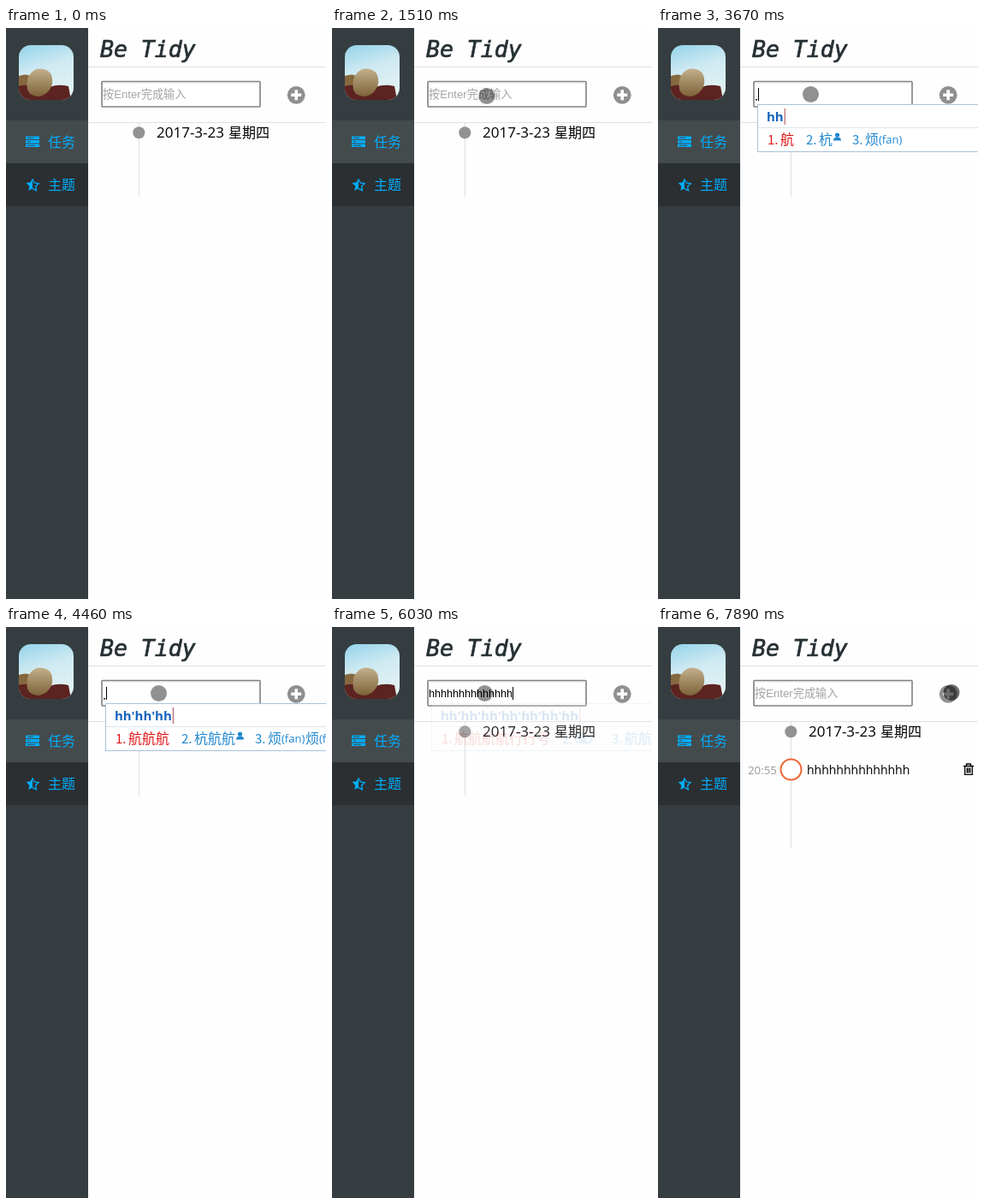
Animation, 374 px wide and 667 px high, one loop 8000 ms. Source, as an HTML page:

```html
<!DOCTYPE html>
<html lang="zh">
<head>
<meta charset="utf-8">
<style>
html, body { margin: 0; width: 100%; height: 100%; overflow: hidden; background: #fefefe; }
svg { display: block; width: 374px; height: 667px; font: 16px "Open Sans", "Noto Sans CJK SC", "Noto Sans CJK", sans-serif; }
.title { font: italic 26.5px "DejaVu Sans Mono", monospace; }
.field { font: 13.2px "Liberation Sans", "Noto Sans CJK SC", "Noto Sans CJK", sans-serif; }
.cjk { font-family: "Noto Sans CJK SC", "Noto Sans CJK", sans-serif; }
#pinyin { font-weight: bold; font-size: 15px; }
</style>
</head>
<body>
<svg viewBox="0 0 374 667">
  <defs>
    <clipPath id="round"><rect x="15" y="20" width="64" height="64" rx="14"/></clipPath>
    <linearGradient id="sky" x2=".3" y2="1">
      <stop stop-color="#94d3ea"/><stop offset=".5" stop-color="#cfeaf2"/><stop offset="1" stop-color="#e2f1f3"/>
    </linearGradient>
    <linearGradient id="fur" x2="0" y2="1">
      <stop stop-color="#c3b08c"/><stop offset="1" stop-color="#7d6238"/>
    </linearGradient>
  </defs>

  <!-- sidebar -->
  <rect width="96" height="667" fill="#353d40"/>
  <rect y="108" width="96" height="50" fill="#444b4d"/>
  <rect y="158" width="96" height="50" fill="#2b2f31"/>
  <g clip-path="url(#round)">
    <rect x="15" y="20" width="64" height="64" fill="url(#sky)"/>
    <path d="M15 56q10-4 16 2l6 26H15z" fill="#86683f"/>
    <path d="M15 68q12-4 22 4 8 4 14-3 10-4 22-1l3 16H15z" fill="#5c2320"/>
    <path d="M25 72q-2-14 4-19 6-7 15-5 9 2 10 11 1 8-3 13-4 6-12 8-11 0-14-8z" fill="url(#fur)"/>
  </g>
  <g fill="#00aeff">
    <rect x="23" y="126.500" width="16" height="3.600" rx=".6"/>
    <rect x="23" y="131" width="16" height="3.600" rx=".6"/>
    <rect x="23" y="135.500" width="16" height="3.600" rx=".6"/>
    <path d="M25 128.300h7M25 132.800h3M25 137.300h9" stroke="#444b4d"/>
    <path d="M31 175.500v12l-4.600 2.400.9-5.200-3.800-3.600 5.200-.8z"/>
    <path d="M31 176.500l2.200 4.500 4.900.7-3.500 3.400.8 4.800-4.400-2.300" fill="none" stroke="#00aeff" stroke-width="1.300"/>
    <text class="cjk" x="49" y="139">任务</text>
    <text class="cjk" x="49" y="189">主题</text>
  </g>

  <!-- header -->
  <text class="title" x="110" y="34" fill="#263034" stroke="#263034" stroke-width=".7">Be Tidy</text>
  <path d="M96 45.500h278M96 110.500h278" stroke="#e0e0e0"/>
  <rect x="112" y="62.500" width="185" height="29.500" rx="1" fill="#fff" stroke="#808080" stroke-width="1.600"/>
  <path d="M113.500 64h182" stroke="#ddd"/>
  <text id="hint" class="field" x="113" y="82" fill="#a4a4a4">按Enter完成输入</text>
  <text id="value" class="field" x="113" y="82" style="font-size:12.600px">hhhhhhhhhhhhhh</text>
  <rect id="mark" x="114" y="83" width="2" height="1.500"/>
  <rect id="caret" y="70" width="1" height="15"/>
  <circle cx="339.200" cy="78.300" r="10.400" fill="#8f8f8f"/>
  <path d="M333.200 78.300h12M339.200 72.300v12" stroke="#fff" stroke-width="3.600"/>

  <!-- timeline -->
  <path id="line" stroke="#dedede"/>
  <circle cx="155.300" cy="122.300" r="7" fill="#929292"/>
  <text x="176" y="128" style="font-size:17px">2017-3-23</text>
  <text class="cjk" x="260" y="128">星期四</text>
  <g id="item">
    <text x="105" y="172" fill="#999" style="font-size:13.300px">20:55</text>
    <circle cx="155.500" cy="166.500" r="12" fill="#fff" stroke="#ee6535" stroke-width="2"/>
    <text x="174" y="172" style="font-size:14px">hhhhhhhhhhhhhh</text>
    <path d="M357 162.500h12M360.500 162v-2h5v2M358.700 163v9.300h8.600V163M361.300 164.500v6M363 164.500v6M364.800 164.500v6" fill="none" stroke="#000" stroke-width="1.300"/>
  </g>

  <!-- input method window -->
  <g id="ime">
    <rect x="116.500" y="89.500" width="270" height="55" fill="#fff" stroke="#a8c3da"/>
    <path d="M117 116.500h257" stroke="#dbe5ec"/>
    <text id="pinyin" x="127" y="109" fill="#1463bd"></text>
    <rect id="bar" y="94" width="1" height="19" fill="#a54a4a"/>
    <g id="list"></g>
  </g>

  <circle id="pointer" r="9.500"/>
</svg>
<script>
const $ = id => document.getElementById(id);
const show = (id, on) => $(id).style.display = on ? "" : "none";

const LOOP = 8000, OPEN = 3420, COMMIT = 5810, GONE = 6080, CLICK = 7830, ADDED = 7890;
const keys = [OPEN, 3670, 3850, 4220, 4340, 4460, 4640, 4820, 4970, 5060, 5150, 5240, 5330, 5450];
const path = [
  [370, 301, 274], [640, 245, 160], [910, 212, 105], [1150, 195, 91], [1570, 178.500, 77.500],
  [6940, 178.500, 77.500], [7030, 225, 85], [7120, 274.500, 76.500], [7240, 318, 63], [7480, 338, 73], [7720, 343, 76.500]
];
const carets = [[1820, 2130], [2620, 3110], [OPEN, 6580], [7070, 7560]];
const within = (t, [a, b]) => t >= a && t < b;

function pointerAt(t) {
  const base = t < 5000 ? 10 : 40;
  const q = Math.floor((t - base) / 60) * 60 + base;
  const i = path.findIndex(p => p[0] > q);
  if (i < 0) return path[path.length - 1].slice(1);
  if (!i) return path[0].slice(1);
  const [a, b] = [path[i - 1], path[i]], p = (q - a[0]) / (b[0] - a[0]);
  return [1, 2].map(k => a[k] + (b[k] - a[k]) * p);
}

const text = (x, s, size = 16) => `<text class="cjk" x="${x}" y="136" style="font-size:${size}px">${s}</text>`;
const person = x => `<circle cx="${x + 5.5}" cy="125" r="2.600"/><path d="M${x + 1} 131.500q0-4 4.500-4t4.500 4z"/>`;
const cloud = x => `<g fill="none" stroke="#1d86cf" stroke-width="1.300"><path d="M${x + 5} 135q-4 0-4-3.500t4-3.500q1-3.500 5-3.500t5 3.500q4 0 4 3.500t-4 3.500z"/><circle cx="${x + 10}" cy="131" r="2.300"/></g>`;

// Candidates for k syllables, laid out from left to right
function candidates(k) {
  const first = "航航航航行行号".slice(0, k), short = k < 4;
  let x = 128, out = `<g fill="#e01414">${text(x, "1.", 15)}${text(x + 15, first)}</g><g fill="#1d86cf">`;
  x += 29 + 16 * k;
  out += text(x, "2.", 15);
  if (short) {
    out += text(x + 15, "杭航航".slice(0, k)) + person(x + 15 + 16 * k);
    x += 38 + 16 * k;
  } else {
    out += cloud(x + 15);
    x += 58;
  }
  out += text(x, "3.", 15);
  if (!short) return out + text(x + 15, "航航航航") + "</g>";
  for (let i = 0; i < k; i++) {
    const u = x + 15 + 44 * i;
    out += text(u, "烦") + `<text x="${u + 16}" y="135" style="font-size:13px">(fan)</text>`;
  }
  return out + "</g>";
}

let typed = 0;
function type(n) {
  if (n === typed) return;
  typed = n;
  $("pinyin").textContent = "h".repeat(n).replace(/hh(?=h)/g, "hh'");
  $("bar").setAttribute("x", 128 + $("pinyin").getComputedTextLength());
  $("list").innerHTML = n ? candidates(Math.ceil(n / 2)) : "";
}

function draw() {
  const t = performance.now() % LOOP;
  const composing = within(t, [OPEN, COMMIT]);
  show("hint", t < OPEN || t >= ADDED);
  show("value", within(t, [COMMIT, ADDED]));
  show("mark", composing);
  show("caret", carets.some(c => within(t, c)));
  $("caret").setAttribute("x", t < OPEN ? 113 : composing ? 117 : 211);

  show("ime", within(t, [OPEN, GONE]));
  $("ime").style.opacity = t < COMMIT ? 1 : Math.max(0, 1 - (t - COMMIT + 50) / (GONE - COMMIT + 50));
  type(keys.filter(k => k <= t).length);

  show("item", t >= ADDED);
  $("line").setAttribute("d", `M155.500 111V${t < ADDED ? 197 : 259}`);

  const [x, y] = pointerAt(t), pressed = within(t, [1570, 2930]) || t >= CLICK;
  show("pointer", t >= 370);
  $("pointer").setAttribute("cx", x);
  $("pointer").setAttribute("cy", y);
  $("pointer").setAttribute("fill-opacity", pressed ? .58 : .43);
  requestAnimationFrame(draw);
}
draw();
</script>
</body>
</html>
```
